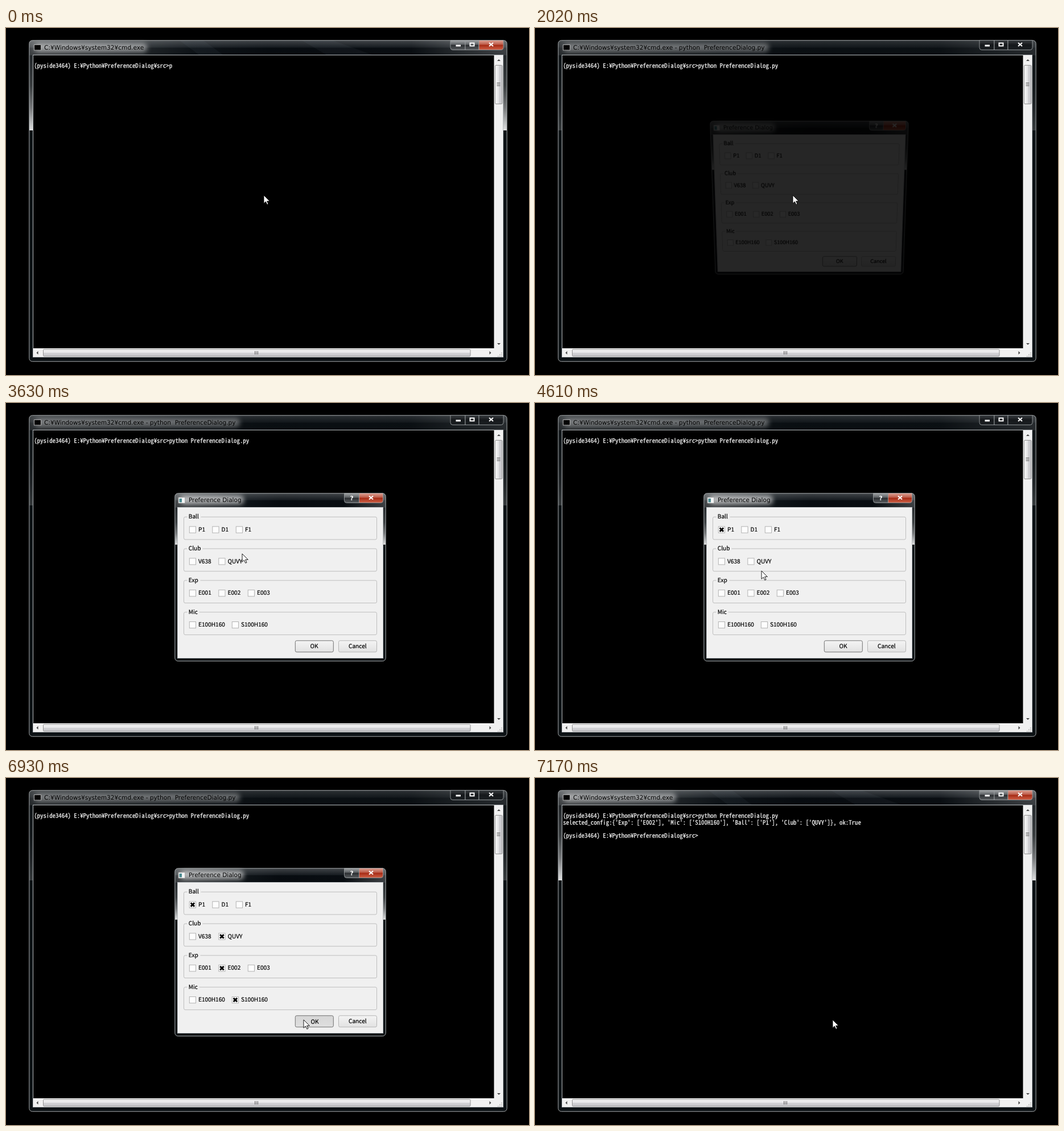
An HTML page for the animation above (8 s loop, 919 px wide and 610 px high).

```html
<!DOCTYPE html>
<html lang="en">
<head>
<meta charset="utf-8">
<title>Preference dialog demo</title>
<style>
  html, body { margin: 0; width: 100%; height: 100%; overflow: hidden; background: #000; }
  svg { position: absolute; left: 0; top: 0; width: 919px; height: 610px; overflow: hidden; }
  text { white-space: pre; text-rendering: geometricPrecision; }
  #dialog { transform-origin: 482px 158px; }
  .title { font: 10.6px "DejaVu Sans", sans-serif; }
  .label { font: 10.1px "Noto Sans CJK JP", "Noto Sans", sans-serif; stroke: #000; stroke-width: .2px; }
  .mono { font-family: "Noto Sans Mono CJK JP", "Noto Sans Mono", monospace; fill: #f4f4f4; stroke: #f4f4f4; stroke-width: .25px; }
</style>
</head>
<body>
<svg id="console" viewBox="0 0 919 610"></svg>
<svg id="dialog" viewBox="0 0 919 610"></svg>
<svg id="pointer" viewBox="0 0 919 610">
  <path id="arrow" d="M0 0V14.4L3.4 11.2L5.8 16.4L8 15.4L5.7 10.4H10.3Z" fill="#fff" stroke="#000" stroke-width=".9"/>
</svg>
<script>
const LOOP = 8000;
const $ = id => document.getElementById(id);
const rect = (x, y, w, h, fill, more = '') =>
  `<rect x="${x}" y="${y}" width="${w}" height="${h}" fill="${fill}" ${more}/>`;
const path = (d, fill, more = '') => `<path d="${d}" fill="${fill}" ${more}/>`;
const text = (x, y, cls, str, more = '') => `<text x="${x}" y="${y}" class="${cls}" ${more}>${str}</text>`;

// stops: [offset, colour, opacity]
const gradient = (id, vertical, stops) =>
  `<linearGradient id="${id}" x2="${vertical ? 0 : 1}" y2="${vertical ? 1 : 0}">` +
  stops.map(([o, c, a = 1]) => `<stop offset="${o}" stop-color="${c}" stop-opacity="${a}"/>`).join('') +
  '</linearGradient>';

const defs = '<defs>' +
  gradient('bar', 0, [[0, '#4b4f52'], [.2, '#2b3034'], [.34, '#10161b'], [.5, '#080d12'], [.8, '#0a0f14'], [.9, '#2c3135'], [1, '#484c50']]) +
  gradient('gloss', 1, [[0, '#fff', .22], [.45, '#fff', .06], [.5, '#000', .1], [1, '#000', .2]]) +
  gradient('side', 1, [[0, '#25292c'], [.4, '#3a3e40'], [.7, '#77797b'], [.9, '#bcbebf'], [1, '#e0e0e0']]) +
  gradient('red', 1, [[0, '#dda396'], [.45, '#bd5a47'], [.5, '#a52a14'], [1, '#cf6249']]) +
  gradient('steel', 1, [[0, '#a3a6a8'], [.45, '#5c6063'], [.5, '#2a2d30'], [1, '#5a5e61']]) +
  gradient('dim', 1, [[0, '#3a3e41'], [.5, '#15181b'], [1, '#1c2023']]) +
  gradient('thumbV', 0, [[0, '#f6f6f6'], [.5, '#e4e4e6'], [.52, '#d2d2d5'], [1, '#c6c6ca']]) +
  gradient('thumbH', 1, [[0, '#f6f6f6'], [.5, '#e4e4e6'], [.52, '#d2d2d5'], [1, '#c6c6ca']]) +
  gradient('button', 1, [[0, '#f4f4f4'], [1, '#e2e2e2']]) +
  gradient('hover', 1, [[0, '#fafafa'], [1, '#eaeaea']]) +
  gradient('pressed', 1, [[0, '#d6d6d6'], [1, '#dfdfdf']]) +
  '<filter id="soft" x="-20%" y="-100%" width="140%" height="300%"><feGaussianBlur stdDeviation="4"/></filter></defs>';

// Glass frame around a client area; the side reflection ends sharply at cut.
function frame(x, y, w, h, client, cut, id) {
  const [cx, cy, cw, ch] = client;
  const side = (sx, sw) => rect(sx, cy, sw, cut - cy, 'url(#side)');
  const bar = `M${x + 1} ${cy}V${y + 6}q0-5 5-5H${x + w - 6}q5 0 5 5V${cy}Z`;
  return rect(x + .8, y + .8, w - 1.6, h - 1.6, '#0d1215', 'rx="5.5"') +
    path(bar, 'url(#bar)', `id="${id}Bar"`) + path(bar, 'url(#gloss)', `id="${id}Gloss"`) +
    `<g id="${id}Sides">${side(x + 1, cx - x - 2)}${side(cx + cw + 1, x + w - cx - cw - 2)}</g>` +
    rect(x + .8, y + .8, w - 1.6, h - 1.6, 'none', 'rx="5.5" stroke="#a9adaf"') +
    rect(cx - .5, cy - .5, cw + 1, ch + 1, 'none', 'stroke="#b9bdc0"');
}

const glow = (id, x, y, w, opacity) =>
  rect(x, y, w, 15, '#fff', `id="${id}" rx="7" opacity="${opacity}" filter="url(#soft)"`);
const caption = (x, y, w, fill, left, right, id = '') =>
  path(`M${x} ${y}h${w}v${17 - right}q0 ${right} ${-right} ${right}h${right + left - w}q${-left} 0 ${-left} ${-left}Z`,
    `url(#${fill})`, `stroke="#989c9f" stroke-width=".9" ${id && `id="${id}"`}`);
const cross = (x, y) => path(`M${x - 3.5} ${y - 3}l7 6m0-6l-7 6`, 'none', 'stroke="#fff" stroke-width="2.1"');
const triangle = (x, y, dx, dy) =>
  path(dx ? `M${x - dx} ${y - 3}v6l${3 * dx}-3Z` : `M${x - 3} ${y - dy}h6l-3 ${3 * dy}Z`, '#444');

// Half-width cells are 5.4 px wide whichever mono family is present.
function monoSize() {
  const ctx = document.createElement('canvas').getContext('2d');
  ctx.font = '100px "Noto Sans Mono CJK JP", "Noto Sans Mono", monospace';
  return 540 / ctx.measureText('0').width;
}

function buildConsole() {
  const grip = [0, 1, 2].flatMap(r => [0, 1, 2].filter(c => c + r > 1)
    .map(c => rect(864 + c * 3, 570.5 + r * 3, 1.6, 1.6, '#b5b5b5'))).join('');
  const ridges = [0, 2.5, 5].map(d =>
    rect(862.5, 96 + d, 6, 1, '#666') + rect(437 + d, 568, 1, 6, '#666')).join('');
  const size = monoSize();
  const line = (i, row) => text(49.2, 70 + row * 11.7, 'mono', '', `id="line${i}" font-size="${size}"`);
  return defs + frame(40, 21, 841, 566, [48, 48, 825, 530], 180, 'console') +
    path('M305 22h42l34 25h-42Z M520 22h55l68 25h-80Z', '#9fb4c8', 'id="streaks" opacity=".05"') +
    glow('consoleGlow', 50, 27, 198, .5) +
    rect(49.5, 29.5, 12, 9.5, '#050505', 'stroke="#aaa"') +
    text(67, 37.6, 'title', '', 'id="consoleTitle"') +
    caption(781, 21.5, 26, 'steel', 4, 0, 'minBox') + caption(807, 21.5, 24, 'steel', 0, 0, 'maxBox') +
    caption(831, 21.5, 43, 'red', 0, 4, 'closeBox') +
    rect(790.5, 29.5, 8.5, 3, '#fff') + rect(815.5, 26.5, 7, 5, 'none', 'stroke="#fff" stroke-width="2"') + cross(852.5, 29) +
    rect(48, 48, 825, 530, '#f1f1f1') + rect(48, 48, 809.5, 515, '#000') +
    rect(859.5, 65.5, 12.5, 68, 'url(#thumbV)', 'rx="1.5" stroke="#929292"') +
    rect(65.5, 565, 750.5, 12, 'url(#thumbH)', 'rx="1.5" stroke="#929292"') + ridges +
    triangle(866, 57, 0, -1) + triangle(866, 555, 0, 1) + triangle(55.5, 571, -1, 0) + triangle(850.5, 571, 1, 0) + grip +
    line(0, 0) + line(1, 1) + line(2, 3);
}

// Each option: label, x and, when used, times of hover, press, check and leave.
const groups = [
  ['Ball', [['P1', 322, [4050, 4300, 4450, 4450]], ['D1', 362.5], ['F1', 404]]],
  ['Club', [['V638', 322], ['QUVY', 373.5, [5030, 5190, 5330, 5450]]]],
  ['Exp', [['E001', 322], ['E002', 373.5, [5690, 5810, 5960, 5960]], ['E003', 425]]],
  ['Mic', [['E100H160', 322], ['S100H160', 397, [5960, 6210, 6360, 6520]]]]
];

function option(y, [name, x, times]) {
  const id = times ? name : '';
  return rect(x + .3, y + 17.1, 11.2, 11.2, '#fdfdfd', `stroke="#b3b3b3" ${id && `id="${id}Box"`}`) +
    (id && path(`M${x + 2.7} ${y + 19.5}l6.4 6.4m0-6.4l-6.4 6.4`, 'none', `id="${id}Mark" stroke="#000" stroke-width="2.9"`)) +
    text(x + 16, y + 25.8, 'label', name);
}

function buildDialog() {
  const box = ([name, options], i) => {
    const y = 200 + i * 55.8, w = { Ball: 21, Club: 24, Exp: 20, Mic: 18 }[name];
    return rect(312.5, y + .3, 339, 39.7, 'none', 'rx="2.5" stroke="#bdbdbd"') +
      rect(318.5, y - 3, w + 3, 7, '#f0f0f0') + text(320.8, y + 3.1, 'label', name) +
      options.map(o => option(y, o)).join('');
  };
  const button = (x, name, stroke, id) =>
    rect(x, 417.8, 67, 20, 'url(#button)', `id="${id}" rx="2.5" stroke="${stroke}"`) +
    text(x + 33.3, 431, 'label', name, `id="${id}Text" text-anchor="middle"`);
  const client = [302, 184, 360, 264];
  return frame(296, 158, 372, 296.5, client, 249, 'dialog') + glow('dialogGlow', 306, 163, 112, .62) +
    rect(303, 166, 11.5, 10, '#f4f4f4', 'stroke="#999" stroke-width=".6"') + rect(304.5, 168, 4.5, 6.5, '#4a8a90') +
    text(321, 174, 'title', 'Preference Dialog', 'style="font-size:10.45px"') +
    caption(594.5, 158.5, 26, 'steel', 4, 0) + caption(620.5, 158.5, 42, 'red', 0, 4) +
    text(607.5, 170.6, 'title', '?', 'fill="#fff" text-anchor="middle" style="font-weight:700"') + cross(641.5, 166.5) +
    rect(...client, '#f0f0f0') + groups.map(box).join('') +
    button(508.3, 'OK', '#707070', 'ok') + button(584.5, 'Cancel', '#b4b4b4', 'cancel');
}

const prompt = '(pyside3464) E:¥Python¥PreferenceDialog¥src&gt;';
const command = 'python PreferenceDialog.py';
const result = "selected_config:{'Exp': ['E002'], 'Mic': ['S100H160'], 'Ball': ['P1'], 'Club': ['QUVY']}, ok:True";

// Timelines of [time, values...]; each value holds until the next time.
const typed = [[0, 1], [150, 2], [280, 3], [420, 5], [700, 6], [850, 7], [1010, 8], [1310, 9], [1440, command.length]];
const pointer = [[0, 453, 294], [3630, 415, 265], [3780, 384, 252], [3900, 359, 238], [4050, 323, 218],
  [4450, 377, 272], [4610, 398, 295], [4760, 399, 289], [4880, 399, 286], [5030, 400, 284], [5190, 401, 283],
  [5330, 402, 288], [5450, 402, 301], [5570, 403, 316], [5690, 403, 332], [5810, 403, 336], [5960, 432, 391],
  [6210, 433, 391], [6360, 452, 395], [6520, 505, 411], [6670, 517, 419], [6790, 522, 422], [6930, 523, 425]];
// opacity, tilt
const presence = [[0, 0, 1], [2020, .16, 1], [2140, .8, .25], [2260, 1, 0], [7050, .35, .6], [7170, 0, 1]];
const at = (line, t) => line.filter(k => k[0] <= t).pop().slice(1);

function set(id, attrs) {
  for (const name in attrs) $(id).setAttribute(name, attrs[name]);
}

function write(id, str) {
  if ($(id).dataset.str !== str) $(id).innerHTML = $(id).dataset.str = str;
}

function drawConsole(t) {
  const active = t < 2020 || t >= 7050;
  const running = t >= 1870 && t < 7170;
  const [count] = at(typed, t);
  write('line0', prompt + command.slice(0, count) + (t >= 850 && t < 1010 ? '_' : ''));
  write('line1', t >= 7050 ? result : '');
  write('line2', t >= 7170 ? prompt : '');
  write('consoleTitle', 'C:¥Windows¥system32¥cmd.exe' + (running ? ' - python  PreferenceDialog.py' : ''));
  set('consoleGlow', { width: running ? 361 : 198, opacity: active ? .5 : .36 });
  set('consoleBar', { opacity: active ? 1 : .5 });
  set('consoleGloss', { opacity: active ? 1 : .6 });
  set('consoleSides', { opacity: active ? 1 : .2 });
  set('streaks', { opacity: active ? .05 : 0 });
  for (const id of ['minBox', 'maxBox', 'closeBox'])
    set(id, { fill: `url(#${!active ? 'dim' : id === 'closeBox' ? 'red' : 'steel'})` });
}

function drawDialog(t) {
  const [opacity, tilt] = at(presence, t);
  const style = $('dialog').style;
  style.opacity = opacity;
  style.transform = tilt ? `matrix3d(${1 - .059 * tilt},0,0,0, 0,${1 - .0344 * tilt},0,${.000194 * tilt}, 0,0,1,0, 0,${5 * tilt},0,1)` : 'none';
  for (const [, options] of groups) for (const [name, , times] of options) {
    if (!times) continue;
    const [hover, press, check, leave] = times;
    const over = t >= hover && t < leave;
    set(name + 'Box', { fill: t >= press && t < check ? '#cfcfcf' : '#fdfdfd', stroke: over ? '#777' : '#b3b3b3' });
    set(name + 'Mark', { opacity: t >= check ? 1 : 0 });
  }
  const down = t >= 6930;
  set('ok', { fill: `url(#${down ? 'pressed' : t >= 6670 ? 'hover' : 'button'})` });
  set('okText', { transform: down ? 'translate(.9 .9)' : '' });
}

function draw(t) {
  drawConsole(t);
  drawDialog(t);
  set('arrow', { transform: `translate(${at(pointer, t).join(' ')})` });
}

$('console').innerHTML = buildConsole();
$('dialog').innerHTML = buildDialog();
const start = performance.now();
function tick() {
  draw((performance.now() - start) % LOOP);
  requestAnimationFrame(tick);
}
tick();
</script>
</body>
</html>
```
